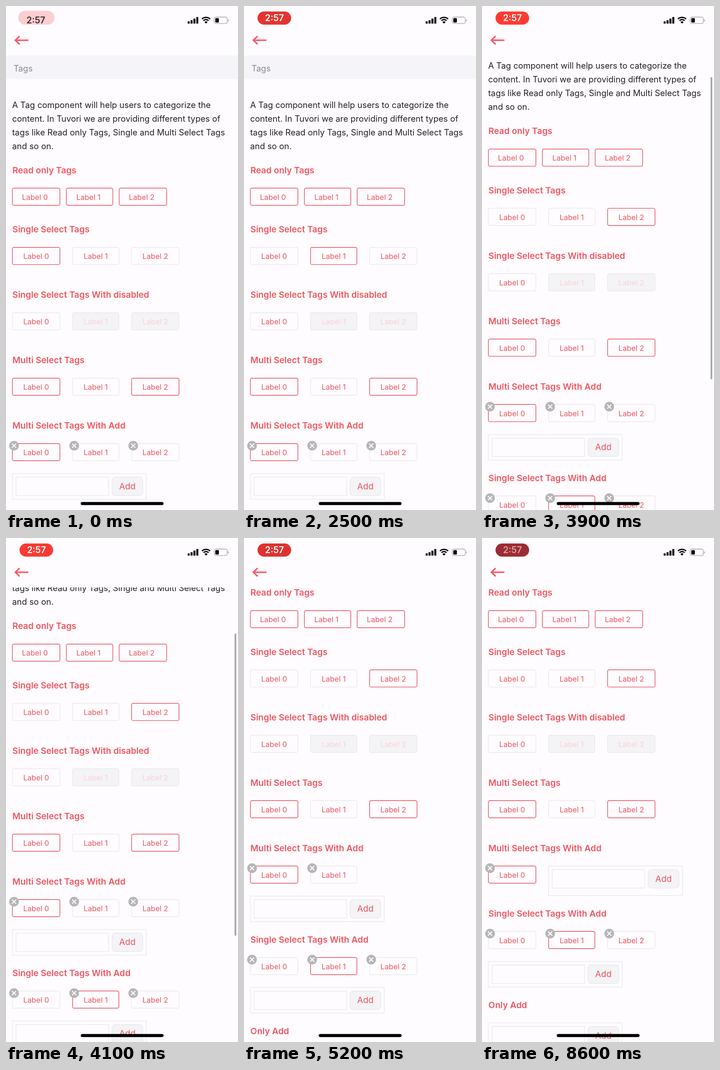
Recreate the animation shown at these times as an HTML page. Size 508x1102 px, loop 8.7 s.

```html
<!DOCTYPE html>
<html lang="en">
<head>
<meta charset="utf-8">
<title>Tags</title>
<style>
  html, body { margin: 0; width: 100%; height: 100%; overflow: hidden; background: #fefcff; }
  svg { display: block; width: 100%; height: 100%; font: 18.4px Inter, "Open Sans", sans-serif; }
  .title { font-size: 19.05px; font-weight: 600; fill: #f0565f; }
  .label { font-size: 16.3px; text-anchor: middle; fill: #ea5560; }
  .off { fill: #f9d2d6; }
  .add { font-size: 18.8px; text-anchor: middle; fill: #ea5560; }
</style>
</head>
<body>
<svg id="stage" viewBox="0 0 508 1102"></svg>
<script>
const LOOP = 8700, SCROLL_END = 239.5;
const RED = '#e6525d', GREY = '#e9e8eb', PALE = '#f4f3f6', PAGE = '#fefcff';
const COLUMNS = [[14, 104], [145.7, 101.5], [275, 103.8]];
const READ_ONLY = [[14, 104], [132.3, 101.5], [247.7, 104]];
const INTRO = [
  'A Tag component will help users to categorize the',
  'content. In Tuvori we are providing different types of',
  'tags like Read only Tags, Single and Multi Select Tags',
  'and so on.'
];
const stage = document.getElementById('stage');

const ramp = (t, from, to) => Math.min(1, Math.max(0, (t - from) / (to - from)));
const mix = (a, b, k) => a + (b - a) * k;
const mixColor = (a, b, k) => a.map((v, i) => Math.round(mix(v, b[i], k)));

const text = (x, y, str, attrs = '') => `<text x="${x}" y="${y}" ${attrs}>${str}</text>`;
const rect = (x, y, w, h, r, fill, stroke = 'none') =>
  `<rect x="${x}" y="${y}" width="${w}" height="${h}" rx="${r}" fill="${fill}" stroke="${stroke}" stroke-width="1.4"/>`;
const title = (y, str) => text(14, y + 6.6, str, 'class="title"');

function closeIcon(x, y) {
  return `<circle cx="${x}" cy="${y}" r="10.6" fill="#b6b5b7"/>
    <path d="M${x - 4.6} ${y - 4.6}l9.2 9.2m0-9.2l-9.2 9.2" stroke="#fff" stroke-width="2"/>`;
}

function tag(i, y, { on, disabled, closable, readOnly }) {
  const [x, w] = (readOnly ? READ_ONLY : COLUMNS)[i];
  const cx = x + w / 2 - (readOnly ? 2.6 : 0);
  return rect(x, y, w, 37.6, 3.5, disabled ? PALE : PAGE, on ? RED : GREY) +
    text(cx, y + 25.4, 'Label ' + i, `class="label ${disabled ? 'off' : ''}"`) +
    (closable ? closeIcon(x + 3.6, y + 4.7) : '');
}

// A titled row of tags; `on` lists the selected indices
function section(y, name, on, { count = 3, disabled = [], ...opts } = {}) {
  const tags = [0, 1, 2].slice(0, count).map(i =>
    tag(i, y + 39.2, { ...opts, on: on.includes(i), disabled: disabled.includes(i) }));
  return title(y, name) + tags.join('');
}

function addForm(x, y, h = 56) {
  return rect(x, y, 293, h, 0, 'none', GREY) +
    rect(x + 8, y + 8, 202.6, 40.2, 0, PAGE, GREY) +
    rect(x + 218.2, y + 8, 67.2, 40.2, 7, PALE, GREY) +
    text(x + 251.8, y + 34.4, 'Add', 'class="add"');
}

function content(t) {
  const selected = t < 1400 ? 0 : t < 2700 ? 1 : 2;
  const left = t < 4900 ? 3 : t < 5900 ? 2 : 1;
  const shift = left === 1 ? -57 : 0;
  const closable = true;
  return rect(0, 108.5, 508, 51.5, 0, '#f5f4f9') +
    text(16.5, 143, 'Tags', 'fill="#8a898c"') +
    INTRO.map((line, i) => text(13.5, 222.6 + 30 * i, line, 'fill="#222124"')).join('') +
    section(359, 'Read only Tags', [0, 1, 2], { readOnly: true }) +
    section(488.6, 'Single Select Tags', [selected]) +
    section(631.5, 'Single Select Tags With disabled', [], { disabled: [1, 2] }) +
    section(774.5, 'Multi Select Tags', [0, 2]) +
    section(917.5, 'Multi Select Tags With Add', [0], { count: left, closable }) +
    (left === 1 ? addForm(145.7, 956.7, 64.5) : addForm(14, 1022.3)) +
    section(1117.5 + shift, 'Single Select Tags With Add', [1], { closable }) +
    addForm(14, 1222.3 + shift) +
    title(1317.5 + shift, 'Only Add') +
    addForm(14, 1356.7 + shift);
}

// Recording pill: fades in, pulses every two seconds, dims when pressed
function clockPill(t) {
  const show = ramp(t, 0, 300), press = ramp(t, 8450, 8550);
  const pulse = (1 + Math.cos((t - 3900) / 1000 * Math.PI)) / 2;
  const red = mixColor([214, 48, 46], [255, 59, 49], pulse);
  const fill = mixColor([253, 206, 209], mixColor(red, [156, 44, 51], press), show);
  const ink = mixColor([64, 40, 46], mixColor([255, 255, 255], [218, 160, 166], press), show);
  const x = mix(27, 29.6, show), y = mix(10.5, 12, show);
  return rect(x, y, mix(79, 73.6, show), 40.8 - y, 14.4, `rgb(${fill})`) +
    text(mix(65.3, 66.7, show), mix(38.2, 33.4, show), '2:57',
      `text-anchor="middle" font-size="19.4" font-weight="600" fill="rgb(${ink})"`);
}

const arc = (r, w) => {
  const d = r * Math.SQRT1_2;
  return `<path d="M${438 - d} ${37.5 - d}A${r} ${r} 0 0 1 ${438 + d} ${37.5 - d}" fill="none" stroke="#000" stroke-width="${w}"/>`;
};
const statusIcons =
  [5, 7.5, 11, 14.5].map((h, i) => rect(397.8 + 6.3 * i, 38.6 - h, 4.4, h, 1.2, '#000')).join('') +
  arc(12.6, 2.8) + arc(7.8, 2.8) +
  '<path d="M438 38.6l-3.4-3.6a4.8 4.8 0 0 1 6.8 0z"/>' +
  rect(456, 24.2, 28.6, 14.2, 4, 'none', '#a5a4a8') +
  rect(458.3, 26.4, 7.8, 9.8, 2, '#000') +
  '<path d="M486.4 29v4.8q1.8-.8 1.8-2.4t-1.8-2.4z" fill="#a5a4a8"/>';
const backArrow = '<path d="M49 74.8H20.5m9.3-9L20.5 74.8l9.3 9" fill="none" stroke="#f75866" stroke-width="3.2"/>';

function draw(t) {
  const scroll = SCROLL_END * Math.sin(ramp(t, 3720, 4500) * Math.PI / 2);
  const bar = ramp(t, 3720, 3820) * (1 - ramp(t, 4900, 5100));
  stage.innerHTML =
    `<g transform="translate(0 ${-scroll})">${content(t)}</g>` +
    rect(0, 0, 508, 108, 0, PAGE) +
    `<g opacity="${bar}">${rect(500.6, 99 + 0.66 * scroll, 3.6, 661, 1.8, '#a4a3a7')}</g>` +
    clockPill(t) + statusIcons + backArrow +
    rect(163.6, 1084.4, 181.4, 6.8, 3.4, '#000');
}

function frame() {
  draw(performance.now() % LOOP);
  requestAnimationFrame(frame);
}
frame();
</script>
</body>
</html>
```
